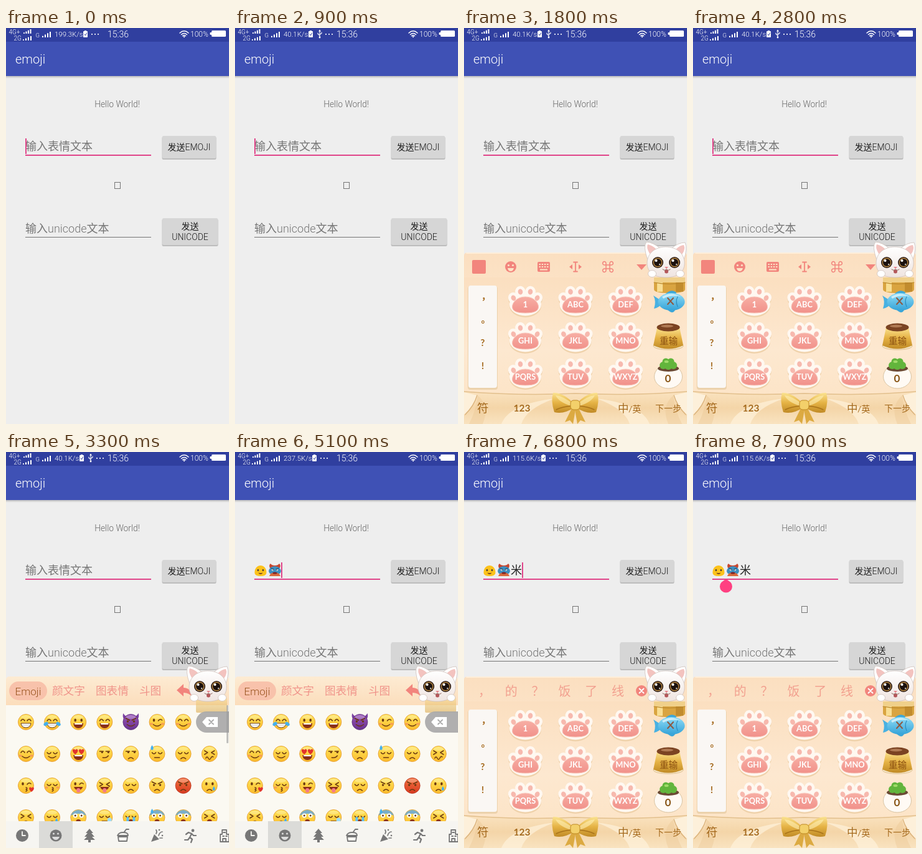
Animation of 358 by 635 pixels, one loop 8 s. Source, as an HTML page:

```html
<!DOCTYPE html>
<html lang="zh">
<head>
<meta charset="utf-8">
<title>emoji</title>
<style>
html,body{margin:0;width:100%;height:100%;overflow:hidden;background:#eee}
svg{display:block;width:100vw;height:100vh}
text{font-family:Roboto,"Noto Sans CJK SC","Noto Sans CJK",sans-serif;font-weight:300}
.key text{font-family:Lato,"Noto Sans CJK SC","Noto Sans CJK",sans-serif;font-weight:700}
.key .plain{font-weight:400}
</style>
</head>
<body>
<svg id="stage" viewBox="0 0 358 635" xmlns="http://www.w3.org/2000/svg"></svg>
<script>
const LOOP = 8000;
const PINK = '#f2857d', BROWN = '#a4691c', ACCENT = '#e0458a', GREY = '#757575';

const rect = (x, y, w, h, fill, r = 0, more = '') =>
  `<rect x="${x}" y="${y}" width="${w}" height="${h}" rx="${r}" fill="${fill}" ${more}/>`;
const oval = (x, y, rx, ry, fill, more = '') =>
  `<ellipse cx="${x}" cy="${y}" rx="${rx}" ry="${ry}" fill="${fill}" ${more}/>`;
const dot = (x, y, r, fill, more) => oval(x, y, r, r, fill, more);
const path = (d, fill, more = '') => `<path d="${d}" fill="${fill}" ${more}/>`;
const line = (d, color, w = 1, more = '') =>
  `<path d="${d}" fill="none" stroke="${color}" stroke-width="${w}" stroke-linecap="round" stroke-linejoin="round" ${more}/>`;
const text = (x, y, size, fill, s, more = '') =>
  `<text x="${x}" y="${y}" font-size="${size}" fill="${fill}" ${more}>${s}</text>`;
const mid = 'text-anchor="middle"', plain = 'class="plain"';
const group = (id, body, more = '') => `<g id="${id}" ${more}>${body}</g>`;
const grad = (id, ...stops) => `<linearGradient id="${id}" x2="0" y2="1">` +
  stops.map((c, i) => `<stop offset="${i / (stops.length - 1)}" stop-color="${c}"/>`).join('') +
  '</linearGradient>';
const at = (x, y, body) => `<g transform="translate(${x} ${y})">${body}</g>`;

function defs() {
  const toes = [[-19, -5, -25], [-8, -15, -8], [8, -15, 8], [19, -5, 25]];
  const toe = (grow, fill) => toes.map(([x, y, a]) =>
    oval(x, y, 3.8 + grow, 4.6 + grow, fill, `transform="rotate(${a} ${x} ${y})"`)).join('');
  const outer = c => toe(4.6, c) + oval(0, 5, 25.5, 18.5, c);
  const paw = at(0, 2.5, outer('#efd2ab')) + outer('#fff8f1') + toe(0, '#f7b9ae') +
    path('M0-7C13-7 21 2 21 9C21 16 14 19 0 19C-14 19-21 16-21 9C-21 2-13-7 0-7Z', 'url(#pad)', 'stroke="#f9c7bb"');
  return '<defs>' + grad('board', '#fbdfc0', '#fde8d0', '#fce2c2') + grad('pad', '#f7aea4', '#f1918a') +
    grad('satin', '#fae2bf', '#f4d5a8', '#f9e3c0') + grad('tabs', '#fdebd3', '#fbd9b4') +
    grad('gold', '#fbe391', '#e5b244', '#c08a26') + grad('tin', '#f7dc92', '#d8a23f') +
    grad('fish', '#8fdcf6', '#35a3d8') + grad('face', '#ffe65a', '#fbbb2c') +
    grad('red', '#f5743f', '#d63a20') + grad('devil', '#9a57b8', '#6a3190') +
    grad('shade', '#bbb', '#eee') + grad('fur', '#fff', '#efe4e0') +
    group('paw', paw) +
    '<clipPath id="panelClip"><rect y="406" width="358" height="186"/></clipPath></defs>';
}

const bars = (x, y, n, h, gap) => Array.from({length: n}, (_, i) =>
  rect(x + i * gap, y - h * (i + 1) / n, 2, h * (i + 1) / n, '#fff')).join('');

function statusBar() {
  const clip = rect(0, 5, 7, 10, '#fff', 1) + rect(2, 4, 3, 2, '#fff') + line('M2 10l1.5 2 2-4', '#303f9f');
  const usb = line('M3 4V15M3 12L0 9.5V8M3 10.5L6 8.5V7', '#fff', 1.1) +
    path('M1 5.5L3 2.5L5 5.5Z', '#fff') + dot(3, 15, 1.4, '#fff');
  const dots = [0, 5, 10].map(x => dot(x, 10, 1.1, '#fff')).join('');
  return rect(0, 0, 358, 22, '#303f9f') +
    text(4.5, 9.5, 10, '#fff', '4G+', plain) + text(12.5, 19.5, 10, '#fff', '2G', plain) +
    bars(28, 9, 4, 7, 3.5) + bars(27, 20, 4, 7, 4) + text(47.5, 14.5, 9.5, '#fff', 'G', plain) +
    bars(58, 15, 4, 9, 4) + text(78, 14, 11.4, '#fff', '', 'id="speed"') +
    group('clip', clip) + group('usb', usb, 'transform="translate(133 0)"') + group('dots', dots) +
    text(163, 15, 14, '#fff', '15:36') +
    line('M279 8Q286 1.5 293 8M281.5 10.5Q286 6.5 290.5 10.5', '#fff', 1.5) +
    line('M283.7 12.7Q286 10.8 288.3 12.7', '#fff', 1.5) + dot(286, 14.2, 1.1, '#fff') +
    text(296, 14, 12, '#fff', '100%') +
    rect(330, 4, 23, 10, '#fff', 1.5) + rect(327.5, 7, 3, 4, '#fff', 1);
}

function button(x, y, w, h, labels) {
  return rect(x - .5, y + 1, w + 1, h + 1, '#bdbdbd', 2.5) + rect(x, y, w, h, '#d6d6d6', 2) +
    labels.map(([s, by]) => text(x + w / 2, by, 14, '#1c1c1c', s, mid)).join('');
}

function app() {
  const blob = path('M31.5 194C31 178 51 178 50.5 194Q50 199 41 199Q32 199 31.5 194Z', '#fcc21b') +
    oval(37, 189.5, 1.3, 1.8, '#513f35') + oval(45, 189.5, 1.3, 1.8, '#513f35') +
    path('M37.5 193.5Q41 194.5 44.5 193.5Q43.5 196 41 196Q38.5 196 37.5 193.5Z', '#7a4a1e');
  const ogre = path('M56 186Q54 181 57 179Q59 182 64 182Q69 182 71 179Q74 181 72 186Z', '#c8452c') +
    path('M54 191Q55 184 64 183Q73 184 74 191Q73 197 64 197Q55 197 54 191Z', '#3e8fc0') +
    path('M55 199Q57 193 64 194Q71 193 73 199Z', '#d9683a') +
    dot(60.5, 189, 1.5, '#fff') + dot(67.5, 189, 1.5, '#fff') + dot(61, 189, .8, '#222') + dot(67, 189, .8, '#222') +
    line('M58 186.5l4 1.2M70 186.5l-4 1.2', '#1d4766', 1.2) + oval(64, 194, 3.5, 1.5, '#7a2428');
  return rect(0, 0, 358, 635, '#eee') + rect(0, 77, 358, 4, 'url(#shade)') + rect(0, 22, 358, 55, '#3f51b5') +
    statusBar() + text(15, 57, 20, '#fff', 'emoji') +
    text(178.5, 127, 13.8, '#666', 'Hello World!', mid) +
    text(31, 196, 18, GREY, '输入表情文本', 'id="hint"') +
    rect(31, 203, 202, 2, ACCENT) +
    group('blob', blob) + group('ogre', ogre) + text(75, 196, 18, '#222', '米', 'id="word"') +
    rect(-1, 177, 2, 25, ACCENT, 0, 'id="caret"') +
    path('M53 203.5L60.5 209A10 10 0 1 1 45.5 209Z', '#ff4081', 'id="handle"') +
    rect(174.5, 247.5, 9, 10, 'none', 0, `stroke="${GREY}"`) +
    text(31, 328, 18, GREY, '输入unicode文本') + rect(31, 335, 202, 1, GREY) +
    button(251, 173, 86, 36, [['发送EMOJI', 196]]) +
    button(251, 305, 89, 43, [['发送', 323], ['UNICODE', 340]]);
}

function cat() {
  const edge = 'stroke="#cfc0ba" stroke-width=".8"';
  const eye = (x, y) => dot(x, y, 9, '#2c1c16') + dot(x, y, 7.4, '#b98a45') + dot(x, y, 6, '#1b110e') +
    dot(x - 2.5, y - 3, 2, '#fff') + dot(x + 3, y + 3, 1, '#fff');
  return path('M295 372Q287 350 293 343Q304 344 316 354ZM332 354Q344 344 355 344Q359 354 353 372Z', '#fff', edge) +
    path('M298 362Q292 351 295 347Q302 348 309 355ZM340 355Q347 348 353 348Q356 355 350 363Z', '#f3c3bf') +
    path('M324 351C342 351 354 362 354 377C354 393 341 400 324 400C307 400 294 393 294 377C294 362 306 351 324 351Z', 'url(#fur)', edge) +
    eye(311, 376) + eye(338, 376) +
    path('M322 383H328L325 386Z', '#e77f87') + oval(325, 390.5, 3, 3, '#b4575a') +
    line('M319 387Q323 390 325 386.5Q327 390 331 387', '#8a5d55') +
    oval(302, 394, 6.5, 5.5, '#fff', edge) + oval(347, 394, 6.5, 5.5, '#fff', edge);
}

function sideKeys() {
  const tin = path('M305 400H355V419Q355 425 330 425Q305 425 305 419Z', '#d9a440') +
    rect(305, 400, 50, 8, '#f0d08a') + rect(310, 408, 9, 15, '#f8dd92') + rect(340, 408, 12, 15, '#b57d22', 0, 'opacity=".6"') +
    line('M305 408Q330 413 355 408', '#b9862c', 1.2);
  const fish = path('M318 438L304 429Q309 438 305 450Q313 449 318 441Z', '#48b1e2') +
    path('M322 428Q332 417 341 424L338 431ZM325 450Q335 461 339 452L334 446Z', '#3ca6d8') +
    oval(333, 439, 21.5, 14, 'url(#fish)') + path('M318 431Q332 422 348 431Q332 427 320 434Z', '#fff', 'opacity=".6"') +
    line('M327 433l9 10M336 433l-9 10', '#8f5a42', 2) + line('M343 431Q339 438 343 447', '#2b8fc2', 1.2);
  const pudding = oval(328, 510, 24, 6, '#f6e6c8', 'stroke="#d7b67f" stroke-width=".8"') +
    path('M310 480L304 509Q328 520 352 509L346 480Z', 'url(#gold)') +
    oval(328, 480, 18.5, 6.5, '#7b4322') + oval(326, 478, 10, 2.2, '#b07a54') +
    text(328.5, 507, 14.5, '#8a4f10', '重输', mid + ' ' + plain);
  const plant = oval(328, 559, 22.5, 19, '#fffaf4', 'stroke="#d9c4a2"') +
    oval(328, 546, 17, 5, '#6a4a34') +
    [[320, 541, 6], [336, 541, 6], [324, 535, 5.5], [332, 535, 5.5], [328, 541, 7]].map(([x, y, r]) => dot(x, y, r, '#62b53c')).join('') +
    oval(325, 535, 3.5, 2, '#a0dc6a') + text(327.5, 568, 17, '#8a5718', '0', mid);
  return tin + fish + pudding + plant;
}

function bow() {
  const half = path('M178 604Q160 584 143 585Q139 598 145 616Q160 620 178 608Z', 'url(#gold)') +
    path('M176 604Q160 590 147 589Q152 600 172 606Z', '#fff0b5', 'opacity=".6"') +
    line('M174 606Q158 607 148 612', '#a9731a', 1.5) +
    path('M174 608L162 632L170 629L175 635L179 612Z', '#dcaa42');
  return half + `<g transform="translate(357 0) scale(-1 1)">${half}</g>` +
    rect(171, 597, 15, 15, '#f3d06a', 5, 'stroke="#c08a26"');
}

function toolbar() {
  const smile = dot(75, 383, 9, PINK) + dot(71.5, 380.5, 1.6, '#fde4c6') + dot(78.5, 380.5, 1.6, '#fde4c6') +
    path('M70 385H80Q79 390 75 390Q71 390 70 385Z', '#fde4c6');
  let keys = rect(118, 375, 20, 16, PINK, 2);
  for (let r = 0; r < 2; r++)
    for (let c = 0; c < 4; c++) keys += rect(120.5 + c * 4.2, 378 + r * 4, 2.4, 2, '#fde4c6');
  keys += rect(122, 386.5, 12, 2, '#fde4c6');
  const loops = 'M228 380H234V386H228ZM228 380H225.5A2.7 2.7 0 1 1 228 377.5ZM234 380V377.5A2.7 2.7 0 1 1 236.5 380ZM234 386H236.5A2.7 2.7 0 1 1 234 388.5ZM228 386V388.5A2.7 2.7 0 1 1 225.5 386Z';
  return rect(13, 372, 22, 22, PINK, 2) + smile + keys +
    line('M179 376V390M176 375.5H182M176 390.5H182', PINK, 1.8) + path('M174 379V387L169 383ZM184 379V387L189 383Z', PINK) +
    line(loops, PINK, 1.5) + path('M277 379H293L285 388Z', PINK);
}

function satin() {
  const corner = path('M0 584L21 589Q15 606 0 620Z', '#fdf0da') + line('M21 589Q16 606 2 620', '#d9b17a', 1.2) +
    path('M22 589Q42 606 30 635H8Q20 612 22 589Z', '#e9c48f', 'opacity=".35"') +
    path('M60 635Q72 603 146 594Q100 610 92 635Z', '#fff3dc', 'opacity=".7"');
  return path('M0 583Q90 590 179 586Q270 590 358 583V635H0Z', 'url(#satin)') +
    line('M0 583Q90 590 179 586Q270 590 358 583', '#e2bf8c', 1.5) +
    corner + `<g transform="translate(358 0) scale(-1 1)">${corner}</g>`;
}

function keyboard() {
  const labels = ['1', 'ABC', 'DEF', 'GHI', 'JKL', 'MNO', 'PQRS', 'TUV', 'WXYZ'];
  const keys = labels.map((s, i) => {
    const x = 98.5 + i % 3 * 80.5, y = 438 + Math.floor(i / 3) * 58;
    return `<g ${s === 'MNO' ? 'id="mno"' : ''}><use href="#paw" x="${x}" y="${y}"/>` +
      text(x, y + 10, 12.8, '#fff', s, mid) + '</g>';
  }).join('');
  // full-width stops sit in the left of their cell
  const column = (id, chars, size) => group(id, [...chars].map((c, i) =>
    text('，。'.includes(c) ? 35 : 30, 435 + i * 37.3, size, BROWN, c, mid)).join(''));
  const guesses = [...'，的？饭了线'].map((c, i) =>
    text(33 + i * 42.8, 391, 20, '#f2a08f', c, mid + ' ' + plain)).join('') +
    dot(285, 383, 9, PINK) + line('M281.5 379.5l7 7M288.5 379.5l-7 7', '#fff', 1.8);
  return rect(0, 360, 358, 275, 'url(#board)', 5) + rect(0, 400, 358, 235, 'url(#board)') +
    line('M4 361H354', '#fff4e2', 1.5) +
    group('tools', rect(48, 361, 63, 52, '#f6b58c', 6, 'id="press" opacity=".5"') + toolbar()) +
    group('guess', guesses) +
    rect(6, 414, 48, 166, '#ecd2ac', 4) + rect(7, 413, 46, 164, '#faf7f4', 4) +
    column('marks', '，。?!', 15) + column('letters', 'omn6', 11) + keys + sideKeys() + satin() + bow() +
    text(21, 616, 18.5, BROWN, '符', plain) + text(93, 615, 15.5, BROWN, '123', mid) +
    text(247, 616, 17.5, BROWN, '中', plain) + text(264, 616, 14, BROWN, '/英', plain) +
    text(307, 615, 14, BROWN, '下一步', 'id="next" ' + plain) +
    group('enter', line('M339 602V610H320', BROWN, 3) + path('M314 610L323 603V617Z', BROWN));
}

const INK = '#6b3a12';
const pair = f => f(-5) + f(5);
const arcs = (d, w = 1.6) => pair(x => line(`M${x - 3}-2q3 ${d} 6 0`, INK, w));
const eyes = {
  d: () => pair(x => oval(x, -3, 1.8, 2.5, INK)),
  a: () => arcs(-5), c: () => arcs(4),
  x: () => line('M-8-5l5 3-5 3M8-5l-5 3 5 3', INK, 1.5),
  h: () => pair(x => path(`M${x} 1C${x - 8}-5 ${x - 3}-10 ${x}-6C${x + 3}-10 ${x + 8}-5 ${x} 1Z`, '#e2342b')),
  w: () => oval(-5, -3, 1.8, 2.6, INK) + line('M2-2q3-4 6-1', INK, 1.6),
  l: () => pair(x => line(`M${x - 3}-4h6`, INK, 1.4) + dot(x + 1, -2.5, 1.6, INK)),
  o: () => pair(x => dot(x, -3, 3.4, '#fff') + dot(x, -3, 1.5, INK)),
  g: () => line('M-8-6l6 3M8-6l-6 3', INK, 1.7) + pair(x => dot(x, -1, 1.7, INK))
};
const mouths = {
  g: () => path('M-8 2H8Q7 9 0 9Q-7 9-8 2Z', '#fff', `stroke="${INK}"`) + line('M-7 5H7', '#aaa', .7),
  o: () => path('M-8 2H8Q7 10 0 10Q-7 10-8 2Z', '#8a3018') + rect(-6, 2, 12, 2, '#fff'),
  s: () => line('M-6 4Q0 9 6 4', INK, 1.5),
  f: () => line('M-4 8Q0 4 4 8', INK, 1.5),
  m: () => line('M-4 6H4', INK, 1.5),
  i: () => line('M-3 6Q3 7 6 3', INK, 1.5),
  k: () => line('M0 3q4 1 0 3q4 1 0 3', INK, 1.4),
  t: () => path('M-7 2H7Q6 7 0 7Q-6 7-7 2Z', '#8a3018') + rect(-3, 4, 6, 7, '#f47a8a', 3),
  r: () => line('M-6 7q2-4 4 0t4 0t4-2', INK, 1.4),
  y: () => oval(0, 7, 4, 4, '#8a3018')
};
const drop = (x, y) => path(`M${x} ${y}q4 6 0 7q-4-1 0-7Z`, '#45b0ee');
const extras = {
  b: () => pair(x => oval(x * 1.8, 3, 2.6, 1.8, '#f58a5c', 'opacity=".7"')),
  j: () => oval(-10, 3, 4, 2.6, '#45b0ee', 'transform="rotate(-35 -10 3)"') + oval(10, 3, 4, 2.6, '#45b0ee', 'transform="rotate(35 10 3)"'),
  s: () => drop(-8, -14) + drop(-8, -13), T: () => drop(7, 1),
  n: () => pair(x => rect(x - 2, -1, 4, 12, '#5fc0f2', 2)),
  B: () => path('M-12.4-3A13 13 0 0 1 12.4-3Q0-9-12.4-3Z', '#5aa0dc', 'opacity=".8"'),
  z: () => dot(8, 4, 3.5, '#9fdcf7'),
  H: () => path('M9 10C2 5 6 0 9 4C12 0 16 5 9 10Z', '#e2342b')
};

// first letter: eyes, second: mouth, rest: extras (D devil, R red)
function face(x, y, code) {
  const [e, m, ...more] = code;
  const devil = more.includes('D'), red = more.includes('R');
  const horns = devil ? path('M-11-4Q-14-10-12-14Q-9-8-4-9ZM11-4Q14-10 12-14Q9-8 4-9Z', '#7a3fa0') : '';
  return at(x, y, horns + dot(0, 0, 12.5, `url(#${devil ? 'devil' : red ? 'red' : 'face'})`, `stroke="${devil ? '#572a78' : red ? '#b5301c' : '#e2952a'}" stroke-width=".8"`) +
    oval(0, -8, 8, 3, '#fff', 'opacity=".25"') +
    (more.includes('B') ? extras.B() : '') + eyes[e]() + mouths[m]() +
    more.map(k => k !== 'B' && extras[k] ? extras[k]() : '').join(''));
}

function bottomIcons() {
  const c = '#777';
  return [
    dot(0, 0, 10, c) + line('M0-6V0H5', '#f6f5f1', 1.8),
    dot(0, 0, 9.5, c) + dot(-3.5, -3, 1.5, '#ddd') + dot(3.5, -3, 1.5, '#ddd') + path('M-6 2H6Q4 7 0 7Q-4 7-6 2Z', '#ddd'),
    path('M0-11L6-4H3L8 2H4L9 7H2V11H-2V7H-9L-4 2H-8L-3-4H-6Z', c),
    line('M-8 2H7L6 9H-7ZM-9 0Q-7-5 0-5Q8-5 8 0ZM2-6L5-10H9', c, 1.8),
    path('M-9 10L-4-2L4 6Z', c) + line('M-1-3Q1-6-1-9M3 0Q5-6 9-6M5 4H9', c, 1.7) + dot(4, -9, 1.3, c) + dot(9, 0, 1.3, c),
    dot(4, -8, 2.4, c) + line('M-7-2L-3-5L2-3L-1 3L3 6L1 11M-1 3L-4 7L-9 7M2-3L5 0H9', c, 2.2),
    line('M-6 10V-2H-3V-9H4V-2H8V10ZM-2 10V5H3V10M-1-5H2M-2 1H0M3 1H5', c, 1.8)
  ].map((s, i) => at(26 + i * 54, 615, s)).join('');
}

function panel() {
  const rows = ['ag agj do ao gsD wsb asb', 'asb cs ho li lf cms cf xr', 'wkH ckb wt xt cf gf gfR dfT', 'xf cfT oyB cmz cyn oysB oyB xy'];
  const faces = rows.map((r, j) => r.split(' ').map((c, i) => face(32 + i * 42.1, 433 + j * 51, c)).join('')).join('');
  const tab = (x, s) => text(x, 389, 17.6, '#f0948a', s);
  return rect(0, 360, 358, 60, 'url(#tabs)', 5) + rect(0, 406, 358, 229, '#fbf9f2') +
    rect(5, 368, 61, 30, '#f8c2ab', 15) + text(14.5, 390, 17, '#9a5520', 'Emoji', plain) +
    tab(74, '颜文字') + tab(144, '图表情') + tab(214, '斗图') +
    path('M274 382L285 372V378Q297 378 299 393Q294 386 285 386V392Z', PINK) +
    rect(305, 394, 50, 24, 'url(#tin)', 2, 'opacity=".55"') +
    `<g clip-path="url(#panelClip)">${faces}</g>` +
    path('M358 416H322A17 17 0 0 0 322 450H358Z', '#aaa', 'opacity=".92"') +
    path('M315 433L322 425H340V441H322Z', '#fff') + line('M326 429.5l7 7M333 429.5l-7 7', '#aaa', 1.8) +
    rect(354, 406, 3, 61, '#999', 1, 'id="scroll" opacity=".6"') +
    rect(0, 592, 358, 43, '#f6f5f1') + rect(53, 592, 54, 43, '#dbdbd8') + bottomIcons();
}

const stage = document.getElementById('stage');
stage.innerHTML = defs() + app() +
  group('ime', group('keys', keyboard(), 'class="key"') + group('panel', panel()) + cat());

const el = {};
stage.querySelectorAll('[id]').forEach(n => el[n.id] = n);
const show = (id, on) => el[id].style.display = on ? '' : 'none';

// start, end, x
const carets = [[0, 400, 32], [900, 1800, 32], [2800, 3300, 32], [3500, 4400, 53],
  [4400, 5000, 75], [5100, 5500, 75], [6800, 7000, 94], [7000, 7400, 53]];
const speeds = [[0, '199.3K/s'], [900, '40.1K/s'], [4400, '237.5K/s'], [6800, '115.6K/s']];

function draw(t) {
  const within = (a, b) => t >= a && t < b;
  const caret = carets.find(([a, b]) => within(a, b));
  show('caret', caret);
  if (caret) el.caret.setAttribute('transform', `translate(${caret[2]} 0)`);

  const usb = within(900, 4400);
  el.speed.textContent = speeds.filter(([a]) => t >= a).pop()[1];
  el.clip.setAttribute('transform', `translate(${usb ? 118 : 124} 0)`);
  el.dots.setAttribute('transform', `translate(${usb ? 146 : 138} 0)`);
  show('usb', usb);

  show('hint', t < 3500);
  show('blob', t >= 3500);
  show('ogre', t >= 4400);
  show('word', t >= 6800);
  show('handle', t >= 7000);

  const emoji = within(3300, 5300), typing = within(5800, 6800);
  show('ime', t >= 1200);
  el.ime.setAttribute('opacity', t < 1300 ? .6 : 1);
  show('keys', !emoji);
  show('panel', emoji);
  show('scroll', t < 4400);
  show('press', within(3100, 3300));
  show('tools', t < 6800);
  show('guess', t >= 6800);
  show('marks', !typing);
  show('letters', typing);
  show('next', !typing);
  show('enter', typing);
  el.mno.setAttribute('opacity', within(5700, 5800) ? .7 : 1);
}

const start = performance.now();
function tick() {
  draw((performance.now() - start) % LOOP);
  requestAnimationFrame(tick);
}
tick();
</script>
</body>
</html>
```
